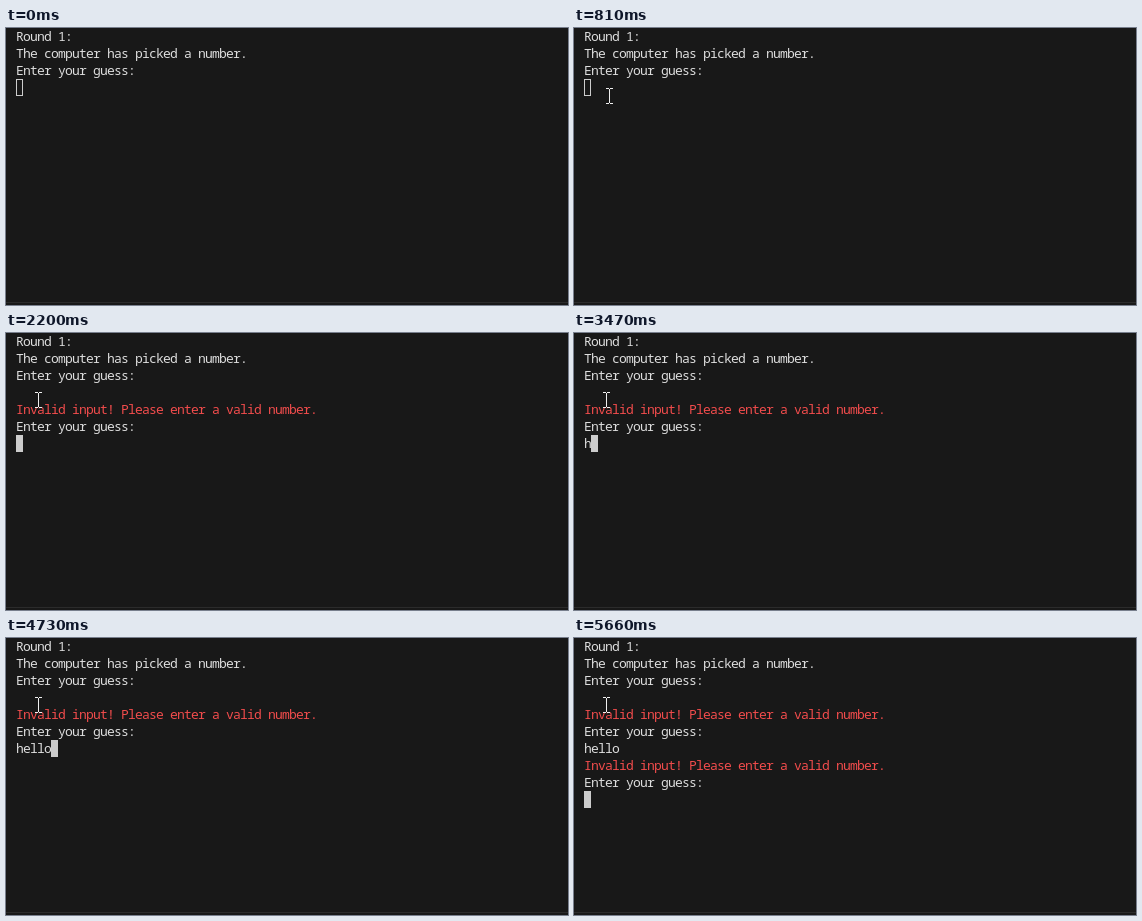
Recreate the animation shown at these times as an HTML page. Size 562x277 px, loop 8000 ms.

```html
<!DOCTYPE html>
<html lang="en">
<head>
<meta charset="utf-8">
<title>Guess the number</title>
<style>
  html, body { margin: 0; width: 100%; height: 100%; overflow: hidden; background: #181818; }
  #stage { position: relative; width: 562px; height: 277px; overflow: hidden; background: #181818; }
  #stage > * { position: absolute; }
  .row {
    left: 10px; margin-top: -1px; white-space: pre; color: #ddd;
    font: 13px/18px "Noto Sans Mono", "DejaVu Sans Mono", monospace;
    letter-spacing: calc(7px - 1ch); /* terminal cells are 7px wide */
    font-variant-ligatures: none;
  }
  .error { color: #f14c4c; }
  #caret { box-sizing: border-box; width: 7px; height: 17px; border: 1px solid #ccc; }
  #caret.focus { background: #ccc; }
  #edge { left: 0; top: 274px; width: 562px; height: 1px; background: #2b2b2b; }
  #beam { left: 0; top: 0; }
</style>
</head>
<body>
<div id="stage">
  <div id="edge"></div>
  <div id="caret"></div>
  <svg id="beam" width="7" height="16" fill="#f0f0f0" shape-rendering="crispEdges">
    <path d="M0 0h3v1h1v-1h3v1h-3v14h3v1h-3v-1h-1v1h-3v-1h3v-14h-3z"/>
  </svg>
</div>
<script>
const LOOP = 8000, ROW = 17, COL = 7, LEFT = 10, FOCUS = 1010;
const ASK = "Enter your guess:";
const ERROR = "Invalid input! Please enter a valid number.";

// [row, text, time shown]
const lines = [
  [0, "Round 1:", 0],
  [1, "The computer has picked a number.", 0],
  [2, ASK, 0],
  [4, ERROR, 2200],
  [5, ASK, 2200],
  [7, ERROR, 5660],
  [8, ASK, 5660]
];
const word = "hello";
const keys = [3470, 3540, 4000, 4530, 4730];

// [time, row, column]
const caretSteps = [
  [0, 3, 0], [2200, 6, 0],
  ...keys.map((t, i) => [t, 6, i + 1]),
  [5590, 7, 0], [5660, 9, 0]
];

// [time, x, y]: a fast sweep in, then small corrections
const sweep = [70, 140, 200, 270, 340, 410, 480].map((t, i) => {
  const rest = (1 - i / 6) ** 1.7;
  return [t, Math.round(42 + 380 * rest), Math.round(64 + 134 * rest)];
});
const beamSteps = [
  ...sweep,
  [680, 39, 62], [740, 34, 61], [810, 32, 60],
  [950, 37, 63], [1010, 31, 60], [1210, 29, 59]
];

const stage = document.getElementById("stage");
const caret = document.getElementById("caret");
const beam = document.getElementById("beam");

function addRow(row, text, cls = "") {
  const el = document.createElement("div");
  el.className = "row " + cls;
  el.style.top = row * ROW + "px";
  el.textContent = text;
  stage.insertBefore(el, caret);
  return el;
}

const rows = lines.map(([row, text, from]) =>
  ({ el: addRow(row, text, text === ERROR ? "error" : ""), from }));
const input = addRow(6, "");

const stepAt = (steps, t) => steps.findLast(s => s[0] <= t);
const place = (el, x, y) => { el.style.transform = `translate(${x}px, ${y}px)`; };

function draw(t) {
  for (const { el, from } of rows) el.style.visibility = t >= from ? "visible" : "hidden";
  input.textContent = word.slice(0, keys.filter(k => k <= t).length);

  const [, row, col] = stepAt(caretSteps, t);
  place(caret, LEFT + col * COL, row * ROW);
  caret.className = t >= FOCUS ? "focus" : "";

  const pos = stepAt(beamSteps, t);
  beam.style.visibility = pos ? "visible" : "hidden";
  if (pos) place(beam, pos[1], pos[2]);
}

const start = performance.now();
function tick() {
  draw((performance.now() - start) % LOOP);
  requestAnimationFrame(tick);
}
tick();
</script>
</body>
</html>
```
